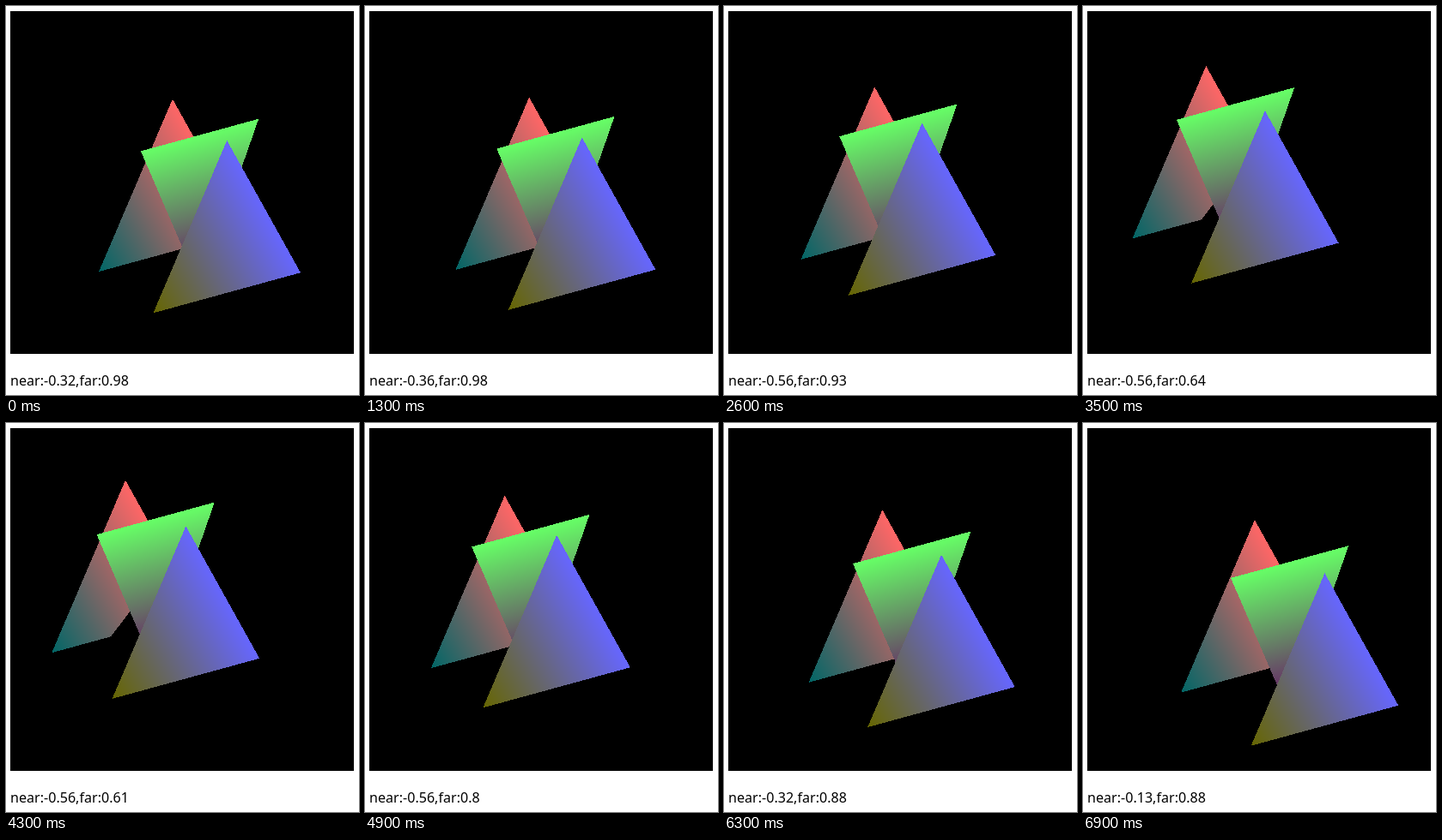
An HTML page that plays this animation: 411x454 px, repeating every 8 s.

```html
<!DOCTYPE html>
<html lang="en">
<head>
<meta charset="utf-8">
<title>Orthographic near and far planes</title>
<style>
  html, body { margin: 0; width: 100%; height: 100%; overflow: hidden; background: #fff; }
  svg { display: block; }
  polygon { shape-rendering: crispEdges; }
  text { font: 16.1px "Noto Sans", "Open Sans", sans-serif; fill: #000; }
</style>
</head>
<body>
<svg width="411" height="454">
  <svg id="view" x="5" y="6" width="400" height="400"><rect width="400" height="400"/></svg>
  <text id="label" x="5" y="443"></text>
</svg>
<script>
const LOOP = 8000, TICK = 100;
const REPEAT_DELAY = 480, REPEAT = 31, STEP = 0.01;
const view = document.getElementById('view');
const label = document.getElementById('label');

// Held keys, each nudging one plane
const presses = [
  { plane: 'near', sign: -1, down: 735, up: 1905 },
  { plane: 'far', sign: -1, down: 2005, up: 3710 },
  { plane: 'far', sign: 1, down: 3740, up: 5130 },
  { plane: 'near', sign: 1, down: 5130, up: 6900 }
];

// View basis for an eye at (-0.15, 0.15, -0.25) with y up
const eye = [0.15, -0.15, 0.25];
const dist = Math.hypot(...eye);
const [bx, by, bz] = eye.map(v => v / dist);
const flat = Math.hypot(bx, bz);
const right = [bz / flat, 0, -bx / flat];
const up = [-by * bx / flat, flat, -by * bz / flat];

const dot = (a, b) => a[0] * b[0] + a[1] * b[1] + a[2] * b[2];
const toScreen = p => [200 + 200 * dot(right, p), 200 - 200 * dot(up, p)];
const overshoot = p => dot([bx, by, bz], p) + dist - 1;

function add(parent, tag, attrs) {
  const el = document.createElementNS('http://www.w3.org/2000/svg', tag);
  set(el, attrs);
  return parent.appendChild(el);
}

function set(el, attrs) {
  for (const name in attrs) el.setAttribute(name, attrs[name]);
}

// One colour channel runs from 0 at the first vertex to full at the other two
function triangle(channel, z, points) {
  const gradient = add(view, 'linearGradient', { id: 'g' + channel, gradientUnits: 'userSpaceOnUse' });
  for (const level of [0, 1]) {
    const rgb = [0, 1, 2].map(i => i === channel ? 255 * level : 102);
    add(gradient, 'stop', { offset: level, 'stop-color': `rgb(${rgb})` });
  }
  const shape = add(view, 'polygon', { fill: `url(#g${channel})` });
  return { z, points, gradient, shape };
}

const upright = [[-0.5, -0.5], [0.5, -0.5], [0, 0.5]];
const inverted = [[0, -0.6], [0.4, 0.4], [-0.4, 0.4]];
const triangles = [upright, inverted, upright].map((points, i) => triangle(i, 0.2 * i - 0.4, points));

function keySteps({ down, up }, time) {
  if (time < down) return 0;
  const held = Math.min(time, up) - down - REPEAT_DELAY;
  return held < 0 ? 1 : 2 + Math.floor(held / REPEAT);
}

function planesAt(time) {
  const planes = { near: -0.32, far: 0.98 };
  for (const p of presses) planes[p.plane] += p.sign * STEP * keySteps(p, time);
  return [planes.near, planes.far].map(v => Math.round(v * 100) / 100);
}

function clipFar(points) {
  return points.flatMap((a, i) => {
    const b = points[(i + 1) % points.length];
    const da = overshoot(a), db = overshoot(b);
    const kept = da <= 0 ? [a] : [];
    if (da * db < 0) kept.push(a.map((v, k) => v + (b[k] - v) * da / (da - db)));
    return kept;
  });
}

// Gradient from the first vertex square onto the opposite edge
function gradientLine([a, b, c]) {
  const dx = c[0] - b[0], dy = c[1] - b[1];
  const k = ((a[0] - b[0]) * dx + (a[1] - b[1]) * dy) / (dx * dx + dy * dy);
  return { x1: a[0], y1: a[1], x2: b[0] + k * dx, y2: b[1] + k * dy };
}

function draw(time) {
  const [near, far] = planesAt(time);
  for (const { z, points, gradient, shape } of triangles) {
    const depth = (-2 * z - far - near) / (far - near);
    const solid = points.map(([x, y]) => [x, y, depth]);
    set(gradient, gradientLine(solid.map(toScreen)));
    set(shape, { points: clipFar(solid).map(toScreen).join(' ') });
  }
  label.textContent = `near:${near},far:${far}`;
}

function frame() {
  draw(Math.floor(performance.now() % LOOP / TICK) * TICK);
  requestAnimationFrame(frame);
}
frame();
</script>
</body>
</html>
```
